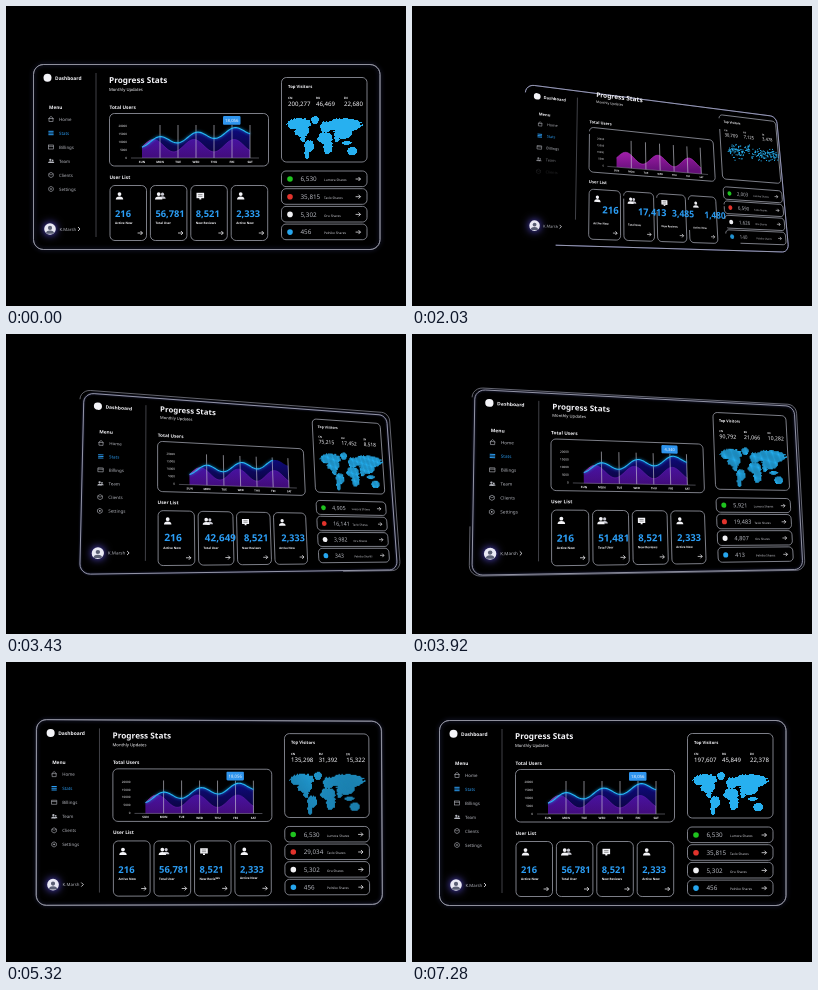
Recreate the animation shown at these times as an HTML page with a canvas. Size 400 by 300 pixels, loop 7.35 s.

```html
<!DOCTYPE html>
<html lang="en">
<head>
<meta charset="utf-8">
<title>Dashboard</title>
<style>
html, body { margin: 0; width: 100%; height: 100%; overflow: hidden; background: #000; }
canvas { display: block; width: 400px; height: 300px; }
</style>
</head>
<body>
<canvas id="stage"></canvas>
<script>
const LOOP = 7350, STEP = 70, CUT = 1064, CLIP = 7364, SETTLE = 4700;
const FONT = '"Noto Sans", "Open Sans", sans-serif';
const BLUE = '#2b9df4', WHITE = '#f4f4f8', GREY = '#b4b6be', LINE = '#a6a8b4';
const PANEL = { x: 27, y: 58, w: 347, h: 186 };
const dpr = window.devicePixelRatio || 1;
const canvas = document.getElementById('stage');
const ctx = canvas.getContext('2d');
canvas.width = 400 * dpr;
canvas.height = 300 * dpr;

let now = 0, tilt = 0, H = null, off = [0, 0], zoom = 1;

const clamp = v => Math.max(0, Math.min(1, v));
const ramp = (a, b) => clamp((now - a) / (b - a));
const ease = p => p * p * (3 - 2 * p);
const group = n => Math.round(n).toLocaleString('en-US');
const count = (end, ms) => group(end * Math.min(1, now / ms));
const rand = n => { const s = Math.sin(n * 127.1 + 11.7) * 43758.5453; return s - Math.floor(s); };

// Each corner swings home along a quadratic of the remaining tilt
function setCamera() {
  tilt = Math.pow(Math.cos(clamp(now / SETTLE) * Math.PI / 2), 1.8);
  const swing = (a, b) => a * tilt + b * tilt * tilt;
  const { x, y, w, h } = PANEL;
  const x0 = x + swing(95, 0), y0 = y + swing(-29, 56);
  const x1 = x + w + swing(44, -60), y1 = y + swing(23, 38);
  const x2 = x + w + swing(75, -79), y2 = y + h + swing(-39, 46);
  const x3 = x + swing(87, 0), y3 = y + h + swing(-6, 0);
  const ax = x1 - x2, ay = y1 - y2, bx = x3 - x2, by = y3 - y2;
  const sx = x0 - x1 + x2 - x3, sy = y0 - y1 + y2 - y3;
  const den = ax * by - bx * ay;
  const g = (sx * by - bx * sy) / den, k = (ax * sy - sx * ay) / den;
  H = [x1 - x0 + g * x1, x3 - x0 + k * x3, x0, y1 - y0 + g * y1, y3 - y0 + k * y3, y0, g, k];
}

// Parallax: shift and enlarge a layer while the panel is tilted
function layer(kx, ky, kz = 0) {
  off = [8 * kx * tilt ** 3, -7.5 * ky * tilt ** 2];
  zoom = 1 + kz * tilt;
}

function project(x, y) {
  const u = .5 + zoom * ((x - PANEL.x) / PANEL.w - .5);
  const v = .5 + zoom * ((y - PANEL.y) / PANEL.h - .5);
  const w = H[6] * u + H[7] * v + 1;
  return [(H[0] * u + H[1] * v + H[2]) / w + off[0], (H[3] * u + H[4] * v + H[5]) / w + off[1]];
}

// Draw in a local frame that follows the panel's tilt at (x, y)
function at(x, y, draw, scale = 1) {
  const o = project(x, y), a = project(x + 1, y), b = project(x, y + 1), k = dpr * scale;
  ctx.save();
  ctx.setTransform(k * (a[0] - o[0]), k * (a[1] - o[1]), k * (b[0] - o[0]), k * (b[1] - o[1]), dpr * o[0], dpr * o[1]);
  draw();
  ctx.restore();
}

function text(str, x, y, size, { color = WHITE, weight = 400, align = 'left', scale = 1 } = {}) {
  at(x, y, () => {
    ctx.scale(size / 20, size / 20);
    ctx.font = `${weight} 20px ${FONT}`;
    ctx.textRendering = 'geometricPrecision';
    ctx.textAlign = align;
    ctx.fillStyle = color;
    ctx.fillText(str, 0, 7.1);
  }, scale);
}

function path(points, close) {
  let len = 0, prev = null;
  ctx.beginPath();
  points.forEach(pt => {
    const q = project(pt[0], pt[1]);
    ctx.lineTo(q[0], q[1]);
    if (prev) len += Math.hypot(q[0] - prev[0], q[1] - prev[1]);
    prev = q;
  });
  if (close) ctx.closePath();
  return len;
}

function stroke(points, color, width, progress = 1, close = false) {
  if (progress <= 0) return;
  const len = path(points, close && progress >= 1);
  ctx.setLineDash(progress < 1 ? [len * progress, len + 5] : []);
  ctx.strokeStyle = color;
  ctx.lineWidth = width;
  ctx.stroke();
  ctx.setLineDash([]);
}

function roundRect(x, y, w, h, r) {
  const pts = [];
  [[x + r, y + r, 2], [x + w - r, y + r, 3], [x + w - r, y + h - r, 0], [x + r, y + h - r, 1]].forEach(([cx, cy, q]) => {
    for (let i = 0; i <= 6; i++) {
      const a = (q + i / 6) * Math.PI / 2;
      pts.push([cx + r * Math.cos(a), cy + r * Math.sin(a)]);
    }
  });
  pts.push(pts[0]);
  return pts;
}

const frame = (x, y, w, h, r, start) =>
  stroke(roundRect(x, y, w, h, r), LINE, .75, ease(ramp(start, start + 650)), true);

function disc(x, y, r, color) {
  ctx.beginPath();
  ctx.arc(x, y, r, 0, 7);
  ctx.fillStyle = color;
  ctx.fill();
}

function box(x, y, w, h, color) {
  ctx.strokeStyle = color;
  ctx.lineWidth = .6;
  ctx.strokeRect(x, y, w, h);
}

function lines(color, width, ...runs) {
  ctx.beginPath();
  runs.forEach(run => run.forEach(([x, y], i) => ctx[i ? 'lineTo' : 'moveTo'](x, y)));
  ctx.strokeStyle = color;
  ctx.lineWidth = width;
  ctx.stroke();
}

const chevron = (x, y) => at(x, y, () => lines(WHITE, .8, [[-1, -2], [1, 0], [-1, 2]]));
function arrow(x, y) {
  at(x, y, () => lines(WHITE, .75, [[-2.4, 0], [2.4, 0]]));
  chevron(x + 1.5, y);
}

function person(x, y, s, color) {
  disc(x, y - 1.9 * s, 1.9 * s, color);
  ctx.beginPath();
  ctx.ellipse(x, y + 3.5 * s, 3.7 * s, 3 * s, 0, Math.PI, 0);
  ctx.fill();
}

function hexagon(color) {
  const corner = (_, i) => [2.6 * Math.sin(i * Math.PI / 3), -2.6 * Math.cos(i * Math.PI / 3)];
  lines(color, .6, Array.from({ length: 7 }, corner));
}

const menu = [
  ['Home', c => { box(-2, -.6, 4, 3, c); lines(c, .6, [[-2.7, -.2], [0, -2.7], [2.7, -.2]]); }],
  ['Stats', c => { for (let i = 0; i < 3; i++) lines(c, 1, [[-2.6, 1.7 * (i - 1)], [2.6, 1.7 * (i - 1)]]); }],
  ['Billings', c => { box(-2.6, -2, 5.2, 4, c); lines(c, .6, [[-2.6, -.7], [2.6, -.7]]); }],
  ['Team', c => { person(-.7, 0, .6, c); person(1.6, .3, .45, c); }],
  ['Clients', c => { hexagon(c); lines(c, .5, [[-2.2, -1.3], [0, 0], [2.2, -1.3]]); }],
  ['Settings', c => { hexagon(c); disc(0, 0, .8, c); }]
];

function sidebar() {
  layer(0, 0);
  ctx.globalAlpha = ramp(250, 750);
  at(41.5, 71.7, () => disc(0, 0, 4, WHITE));
  text('Dashboard', 49, 72, 4.9, { weight: 700 });
  at(44, 223, () => {
    ctx.shadowColor = '#6a5cff';
    ctx.shadowBlur = 9 * dpr;
    disc(0, 0, 5.8, '#e9e9f4');
    ctx.shadowBlur = 0;
    ctx.clip();
    person(0, 1, 1.1, '#5a5f74');
  });
  text('K.Marsh', 53.5, 223, 4.3, { color: GREY });
  chevron(73, 223);
  stroke([[90, 67], [90, 231]], '#5c5d66', .7, ease(ramp(250, 1150)));

  layer(.2, 1);
  text('Menu', 43, 101, 4.7, { weight: 700 });
  menu.forEach(([name, icon], i) => {
    const y = 113 + 14 * i, color = i === 1 ? BLUE : GREY;
    ctx.globalAlpha = clamp((now - 480 - 110 * i) / 230);
    at(45, y, () => icon(color));
    text(name, 53, y, 4.4, { color, weight: 500 });
  });
  ctx.globalAlpha = 1;
}

function wave(y, slope, amp, peak, period) {
  const pts = [];
  for (let x = 136; x <= 244; x++)
    pts.push([x, y - slope * (x - 136) - amp * Math.cos(2 * Math.PI * (x - peak) / period)]);
  return pts;
}

const users = wave(137, .12, 4.2, 153.5, 37.5);
const visits = wave(139.7, 0, 6.2, 147.5, 40.3);

function area(points, top, bottom) {
  path([[136, 152], ...points, [244, 152]], true);
  const a = project(190, 121), b = project(190, 152);
  const fill = ctx.createLinearGradient(a[0], a[1], b[0], b[1]);
  fill.addColorStop(0, top);
  fill.addColorStop(1, bottom);
  ctx.fillStyle = fill;
  ctx.fill();
}

function chart() {
  frame(103.5, 107.5, 159, 52.5, 5, 350);
  const rise = ease(ramp(250, 850));
  const hump = visits.map(([x, y]) => [x, 152 - (152 - y) * rise]);
  area(hump, '#b322b8', '#640f78');
  ctx.globalAlpha = rise;
  stroke(hump, '#b432c0', .7);
  ctx.globalAlpha = ease(ramp(1250, 2050));
  area(users, 'rgba(20,16,180,.72)', 'rgba(24,8,130,.45)');
  ctx.globalAlpha = ramp(350, 800);
  ['SUN', 'MON', 'TUE', 'WED', 'THU', 'FRI', 'SAT'].forEach((day, i) => {
    const x = 136 + 18 * i;
    if (i) stroke([[x, 119], [x, 152]], '#d0d0dc', .6);
    text(day, x, 156, 3, { weight: 600, align: 'center' });
  });
  for (let i = 0; i < 5; i++)
    text(20000 - 5000 * i, 121, 120.3 + 7.8 * i, 3, { align: 'right', weight: 500 });
  stroke([[125, 152], [253, 152]], '#8d8d9a', .5);
  ctx.globalAlpha = 1;
  ctx.shadowColor = '#1aa8ff';
  ctx.shadowBlur = 3 * dpr;
  stroke(users, '#27b9f5', 1.1, ease(ramp(1500, 2650)));
  ctx.shadowBlur = 0;

  ctx.globalAlpha = ramp(2580, 2720);
  path(roundRect(217, 110, 17.5, 8.8, 1.2), true);
  ctx.fillStyle = '#2f95ee';
  ctx.fill();
  text(group(18056 * ramp(2600, 3665)), 225.8, 114.5, 4.3, { align: 'center' });
  ctx.globalAlpha = 1;
}

const cards = [['Active Now', 216, 735], ['Total User', 56781, 3150], ['New Reviews', 8521, 2362], ['Active Now', 2333, 1523]];

function cardIcon(name) {
  if (name === 'New Reviews') {
    ctx.fillStyle = WHITE;
    ctx.fillRect(-3.8, -3.2, 7.6, 5.4);
    ctx.fillRect(-1, 2, 2, 1.5);
    lines('#333', .5, [[-2.2, -1.4], [2.2, -1.4]], [[-2.2, .3], [2.2, .3]]);
    return;
  }
  if (name === 'Total User') person(2.6, -.2, .85, '#c9c9d2');
  person(name === 'Total User' ? -1.2 : 0, 0, 1, WHITE);
}

function main() {
  layer(1.4, 1.6);
  ctx.globalAlpha = ramp(250, 750);
  text('Progress Stats', 103, 74, 8.2, { weight: 600 });
  text('Monthly Updates', 103, 83.3, 4.2);
  layer(.8, .3, .045);
  text('Total Users', 103.5, 101, 4.75, { weight: 700 });
  text('User List', 103.5, 171, 4.75, { weight: 700 });
  ctx.globalAlpha = 1;
  chart();
  cards.forEach(([name, end, ms], i) => {
    const x = 104 + 40.4 * i;
    layer(.8, .3, .045);
    frame(x, 179.5, 36.5, 55, 5, 300 + 70 * i);
    ctx.globalAlpha = ramp(350 + 60 * i, 800 + 60 * i);
    at(x + 9.5, 190, () => cardIcon(name));
    text(name, x + 5, 217, 3.1, { weight: 700 });
    arrow(x + 30, 227);
    layer(2.6, 1.3, .07);
    text(count(end, ms), x + 5, 208, 9.3, { color: BLUE, weight: 700, scale: 1 + .15 * tilt });
    ctx.globalAlpha = 1;
  });
}

// Continents as ellipses: centre, radii
const lands = [
  [13, 8, 12, 6], [16, 15, 7, 6], [17, 22, 2.5, 4], [29, 4, 4, 4],
  [23, 30, 5, 6], [21, 37, 2.5, 6], [39, 22, 7.5, 5.5], [42, 30, 4.5, 8],
  [40, 11, 6, 5.5], [58, 9, 18, 6.5], [57, 17, 9, 6], [51, 22, 2.5, 4.5],
  [61, 27, 5, 1.8], [66, 35, 5, 4]
];

const dots = [];
for (let y = .5; y < 44; y++) {
  for (let x = .5; x < 77; x++) {
    const coast = 1 + .22 * Math.sin(x * 1.3 + y * .6) * Math.cos(y * 1.1 - x * .5);
    if (lands.some(([cx, cy, rx, ry]) => ((x - cx) / rx) ** 2 + ((y - cy) / ry) ** 2 < coast))
      dots.push([x, y, rand(x * 3 + y * 71), rand(x * 13 + y * 37)]);
  }
}

function worldMap() {
  layer(1, .3, .07);
  const shown = ramp(720, 1800) * 1.05, loose = (1 - ramp(500, 2500)) ** 2;
  ctx.fillStyle = '#27b0f0';
  dots.forEach(([x, y, a, b]) => {
    if (y / 43 * .6 + a * .4 > shown) return;
    const [px, py] = project(280 + x + (a - .4) * 14 * loose, 110 + y + (b - .2) * 14 * loose);
    ctx.fillRect(px - .5, py - .5, 1.02, 1.02);
  });
}

const shares = [
  ['Lumora Shares', '#1fc31f', 6530, 3150],
  ['Tavlo Shares', '#e2332c', 35815, 5250],
  ['Oru Shares', '#f1f1f4', 5302, 3150],
  ['Pelniko Shares', '#26a6ee', 456, 3150]
];

function rightSide() {
  layer(.6, .3, .03);
  frame(275.5, 71.5, 85.5, 84.5, 5, 400);
  ctx.globalAlpha = ramp(350, 850);
  text('Top Visitors', 282, 80.3, 4.2, { weight: 700 });
  [['CN', 31.79], ['RU', 7.376], ['IN', 3.6]].forEach(([code, rate], i) => {
    const x = 282 + 28 * i;
    text(code, x, 92, 3, { weight: 700 });
    text(group(rate * now), x, 97.8, 6.1, { weight: 500 });
  });
  ctx.globalAlpha = 1;
  worldMap();
  layer(.6, .2, .03);
  shares.forEach(([name, color, end, ms], i) => {
    const y = 173 + 17.7 * i;
    frame(275.5, y - 8, 85.5, 15.6, 4.5, 300 + 60 * i);
    ctx.globalAlpha = ramp(350 + 60 * i, 850 + 60 * i);
    at(284, y, () => disc(0, 0, 2.8, color));
    text(count(end, ms), 294.5, y, 6.3, { color: GREY, weight: 300 });
    text(name, 318, y + 1, 3.2, { color: '#d0d1d8' });
    arrow(352, y);
    ctx.globalAlpha = 1;
  });
}

function shell() {
  const edge = roundRect(27.5, 58.5, 346.5, 185, 10);
  layer(0, 0);
  ctx.shadowColor = '#474c90';
  ctx.shadowBlur = 4 * dpr * (1 - tilt);
  stroke(edge, '#a9abba', .85, ramp(80, 1230), true);
  ctx.shadowBlur = 0;
  if (tilt > 0) {
    layer(0, .5, .04);
    stroke(edge, '#8e909c', .7, ramp(1550, 3050), true);
  }
}

function render(t) {
  now = (t - CUT + CLIP) % CLIP;
  ctx.setTransform(dpr, 0, 0, dpr, 0, 0);
  ctx.globalAlpha = 1;
  ctx.fillStyle = '#000';
  ctx.fillRect(0, 0, 400, 300);
  setCamera();
  shell();
  sidebar();
  main();
  rightSide();
}

const begin = performance.now();
function tick() {
  const t = (performance.now() - begin) % LOOP;
  render(Math.floor(t / STEP) * STEP);
  requestAnimationFrame(tick);
}
tick();
</script>
</body>
</html>
```
